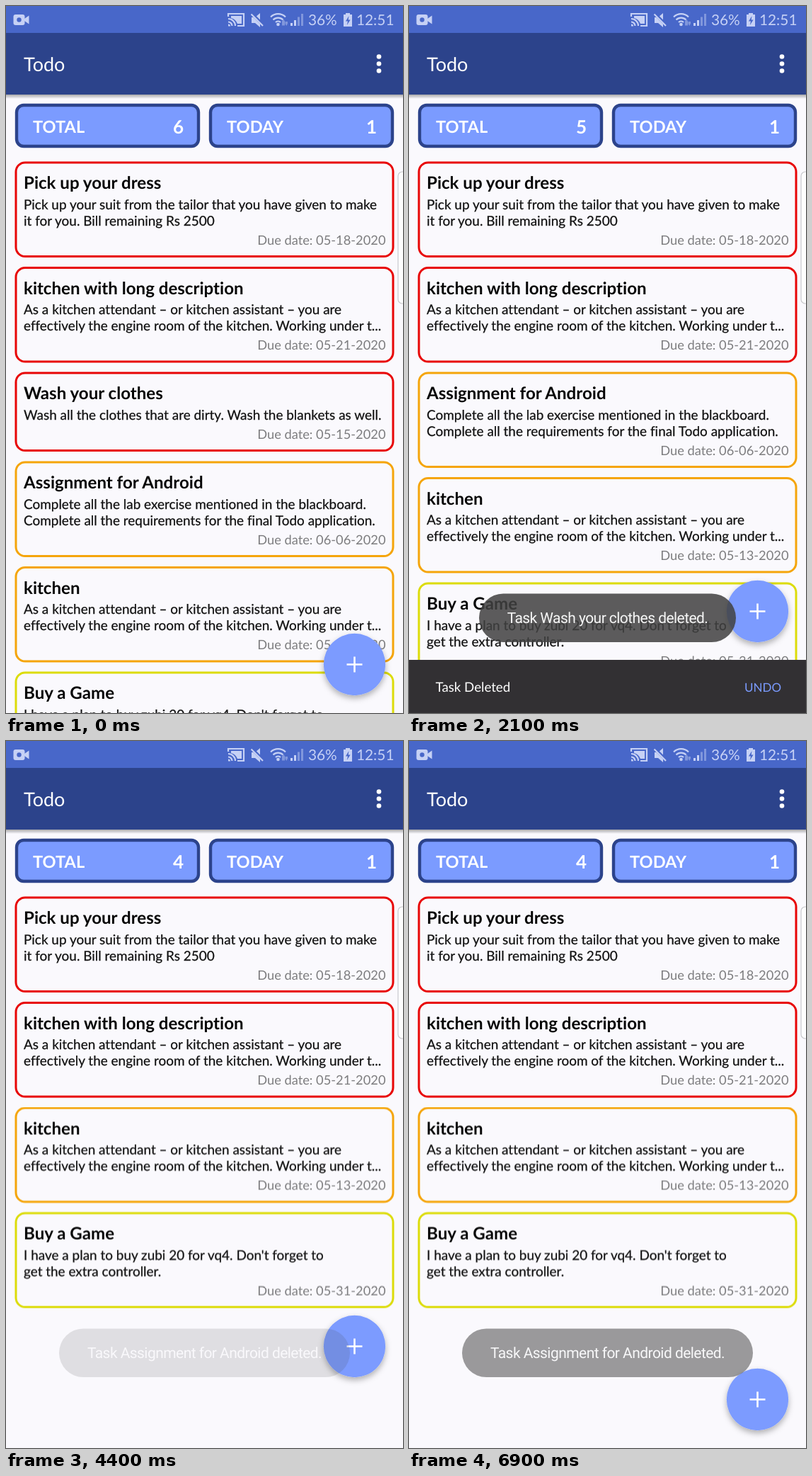
These frames come from a looping animation (561 px wide and 998 px high, 7000 ms). An HTML page:

```html
<!DOCTYPE html>
<html lang="en">
<head>
<meta charset="utf-8">
<title>Todo</title>
<style>
  html, body { margin: 0; width: 100%; height: 100%; overflow: hidden; background: #faf9fd; }
  svg { display: block; width: 100%; height: 100%; }
  text {
    font-family: Lato, "Open Sans", sans-serif;
    font-variant-ligatures: none;
    text-rendering: geometricPrecision;
  }

  .title { font-size: 24.1px; font-weight: 700; fill: #050505; }
  .body { font-size: 18.95px; fill: #111; stroke: #111; stroke-width: .25px; }
  .due { font-size: 18.3px; fill: #7d7d7f; text-anchor: end; }
  .card rect { fill: #faf9fd; stroke-width: 3; }
  .tile rect { fill: #7b9bff; stroke: #2c438b; stroke-width: 4.4; }
  .tile text { font-size: 23.6px; font-weight: 700; fill: #fff; }
  .tile .num { font-size: 26px; text-anchor: end; }
  .status { fill: #c6d1f5; }
  .status text { font-size: 20.8px; }
  .status .line { fill: none; stroke: #c6d1f5; stroke-width: 2.2; }
  .status .dim { fill: #8197dc; }
  .toast rect { fill: #424242; fill-opacity: .86; }
  .toast text { font: 21px Roboto, sans-serif; letter-spacing: -.55px; fill: #f6f6f6; text-anchor: middle; }

  /* Every part shares one 7 s loop: 1% = 70 ms. */
  .anim { animation: 7s linear infinite; }
  #swipe1 { animation-name: swipe1; animation-timing-function: cubic-bezier(.45, 0, .8, .8); }
  #swipe2 { animation-name: swipe2; animation-timing-function: cubic-bezier(.4, 0, .8, .8); }
  #shift1 { animation-name: shift1; }
  #shift2 { animation-name: shift2; }
  #shift1, #shift2 { animation-timing-function: cubic-bezier(.364, 0, .636, 1); }
  #fab { animation-name: fab; }
  #snackbar { animation-name: snackbar; }
  #fab, #snackbar { animation-timing-function: cubic-bezier(.4, 0, .2, 1); }
  #message { animation-name: message; }
  #toast1 { animation-name: toast1; }
  #toast2 { animation-name: toast2; }
  #six { animation-name: six; }
  #five { animation-name: five; }
  #four { animation-name: four; }
  #six, #five, #four { animation-timing-function: step-end; }

  @keyframes swipe1 {
    0%, 13.57% { transform: none; }
    23.43%, 100% { transform: translateX(560px); }
  }
  @keyframes swipe2 {
    0%, 55.72% { transform: none; }
    59%, 100% { transform: translateX(560px); }
  }
  @keyframes shift1 {
    0%, 26% { transform: none; }
    29.57%, 100% { transform: translateY(-126px); }
  }
  @keyframes shift2 {
    0%, 59.29% { transform: none; }
    62.71%, 100% { transform: translateY(-148.5px); }
  }
  /* The button hops up once, then rides on the sliding bar. */
  @keyframes fab {
    0%, 23.71% { transform: none; }
    23.72%, 24.85% { transform: translateY(-75px); }
    24.86% { transform: none; }
    28.43%, 54.96% { transform: translateY(-75px); }
    58.53%, 62.14% { transform: none; }
    62.15%, 62.92% { transform: translateY(-75px); }
    62.93% { transform: none; }
    65.64%, 92.14% { transform: translateY(-75px); }
    95.71%, 100% { transform: none; }
  }
  @keyframes snackbar {
    0%, 24.86% { transform: translateY(75px); }
    28.43%, 54.96% { transform: none; }
    58.53%, 62.93% { transform: translateY(75px); }
    65.64%, 92.14% { transform: none; }
    95.71%, 100% { transform: translateY(75px); }
  }
  @keyframes message {
    0%, 25.86% { opacity: 0; }
    28.43%, 54.96% { opacity: 1; }
    57.53%, 63.5% { opacity: 0; }
    65.64%, 92.14% { opacity: 1; }
    94.71%, 100% { opacity: 0; }
  }
  /* Toasts appear on a decelerating and leave on an accelerating parabola. */
  @keyframes toast1 {
    0%, 24.43% { opacity: 0; animation-timing-function: cubic-bezier(.333, .667, .667, 1); }
    29.86% { opacity: 1; }
    55.72% { opacity: 1; animation-timing-function: cubic-bezier(.333, 0, .667, .333); }
    60.71%, 100% { opacity: 0; }
  }
  @keyframes toast2 {
    0%, 62.36% { opacity: 0; animation-timing-function: cubic-bezier(.333, .667, .667, 1); }
    68.07% { opacity: 1; }
    95% { opacity: 1; animation-timing-function: cubic-bezier(.333, 0, .667, .333); }
    100% { opacity: .234; }
  }
  @keyframes six { 0% { opacity: 1; } 25.14%, 100% { opacity: 0; } }
  @keyframes five { 0% { opacity: 0; } 25.14% { opacity: 1; } 59.29%, 100% { opacity: 0; } }
  @keyframes four { 0% { opacity: 0; } 59.29%, 100% { opacity: 1; } }
</style>
</head>
<body>
<svg viewBox="0 0 561 998" preserveAspectRatio="none">
  <defs>
    <linearGradient id="shade" x2="0" y2="1">
      <stop offset="0" stop-color="#000" stop-opacity=".38"/>
      <stop offset="1" stop-color="#000" stop-opacity="0"/>
    </linearGradient>
    <filter id="drop" x="-30%" y="-30%" width="160%" height="160%">
      <feDropShadow dx="0" dy="4" stdDeviation="4" flood-color="#000" flood-opacity=".3"/>
    </filter>
  </defs>
  <rect width="561" height="998" fill="#faf9fd"/>

  <g id="fixed"></g>
  <g id="swipe1" class="anim"></g>
  <g id="shift1" class="anim">
    <g id="swipe2" class="anim"></g>
    <g id="shift2" class="anim"></g>
  </g>

  <g class="tile">
    <rect x="15" y="140" width="257" height="58" rx="10"/>
    <text x="38" y="179">TOTAL</text>
    <text id="six" class="num anim" x="251" y="179.5">6</text>
    <text id="five" class="num anim" x="251" y="179.5">5</text>
    <text id="four" class="num anim" x="251" y="179.5">4</text>
    <rect x="289" y="140" width="257" height="58" rx="10"/>
    <text x="312" y="179">TODAY</text>
    <text class="num" x="524" y="179.5">1</text>
  </g>

  <rect y="124" width="561" height="7" fill="url(#shade)"/>
  <rect y="37" width="561" height="88" fill="#2c438b"/>
  <rect width="561" height="38" fill="#4867c9"/>
  <text x="25" y="92" font-size="27" fill="#fff">Todo</text>
  <g fill="#fff">
    <circle cx="527" cy="71.5" r="3.3"/>
    <circle cx="527" cy="81.5" r="3.3"/>
    <circle cx="527" cy="91.5" r="3.3"/>
  </g>

  <g class="status">
    <rect x="10.5" y="12" width="16" height="15" rx="3"/>
    <path d="M26 18l6.500-4.500v12L26 21z"/>
    <circle cx="18.5" cy="19.5" r="3.2" fill="#4867c9"/>
    <path class="line" d="M314 15v-4h22v17h-9M314 18a10 10 0 0 1 10 10M314 22.500a5.500 5.500 0 0 1 5.500 5.500"/>
    <path d="M318 14h15v11h-6a13 13 0 0 0-9-8z"/>
    <path d="M314 25.500a3 3 0 0 1 3 3h-3zM347 16h5l7-6v20l-7-6h-5z"/>
    <path d="M347 10.500l17 17" stroke="#4867c9" stroke-width="4.5"/>
    <path class="line" d="M346.500 11.500l16.500 16.500"/>
    <path class="line" d="M374 15.500a15 15 0 0 1 21 0M377.500 19.500a10 10 0 0 1 14 0M381 23a5 5 0 0 1 7 0"/>
    <circle cx="384.5" cy="26" r="2.3"/>
    <path class="dim" d="M390 21.500l2-3 2 3v6h-4zM394.500 22h3.500v3l-1.800 3-1.700-3z"/>
    <rect x="402" y="24" width="3" height="4"/>
    <rect x="407" y="20" width="3" height="8"/>
    <rect class="dim" x="412" y="15.5" width="3" height="12.5"/>
    <rect class="dim" x="417" y="11" width="3" height="17"/>
    <text x="427" y="27">36%</text>
    <path d="M480 12v-2h6v2h3v17h-12V12z"/>
    <path d="M484.500 14l-4.500 7.500h3l-1.200 5.500 4.800-7.500h-3z" fill="#4867c9"/>
    <text x="495" y="27">12:51</text>
  </g>

  <rect x="554" y="234" width="20" height="186" rx="6" fill="#fdfdfe" stroke="#c9c9cd" stroke-width="1.2"/>

  <g id="snackbar" class="anim">
    <rect y="923" width="561" height="75" fill="#323033"/>
    <g id="message" class="anim">
      <text x="37.5" y="968" font-size="18.7" fill="#fff">Task Deleted</text>
      <text x="474" y="968" font-size="17" fill="#7b9bff">UNDO</text>
    </g>
  </g>

  <g id="fab" class="anim">
    <circle cx="492.5" cy="929.5" r="43.7" fill="#7b9bff" filter="url(#drop)"/>
    <path d="M481.500 929.500h22M492.500 918.500v22" stroke="#fff" stroke-width="2.6"/>
  </g>

  <g id="toast1" class="toast anim">
    <rect x="99" y="829.5" width="363" height="68.5" rx="34.25"/>
    <text x="280.5" y="870.5">Task Wash your clothes deleted.</text>
  </g>
  <g id="toast2" class="toast anim">
    <rect x="75" y="829.5" width="411" height="68.5" rx="34.25"/>
    <text x="280.5" y="870.5">Task Assignment for Android deleted.</text>
  </g>
</svg>
<script>
  const RED = '#e80505', ORANGE = '#f5a50a', YELLOW = '#dcdc08';
  const LINE = 23;
  const attendant = [
    'As a kitchen attendant – or kitchen assistant – you are',
    'effectively the engine room of the kitchen. Working under t...'
  ];

  function addCard(parent, top, color, title, lines, due) {
    const extra = (lines.length - 1) * LINE;
    const body = lines.map((line, i) =>
      `<text class="body" x="25" y="${67 + i * LINE}">${line}</text>`).join('');
    document.getElementById(parent).insertAdjacentHTML('beforeend', `
      <g class="card" transform="translate(0 ${top})">
        <rect x="14" y="1.5" width="533" height="${109.5 + extra}" rx="13" stroke="${color}"/>
        <text class="title" x="25" y="38.5">${title}</text>
        ${body}
        <text class="due" x="536.5" y="${94 + extra}">Due date: ${due}</text>
      </g>`);
  }

  addCard('fixed', 219.5, RED, 'Pick up your dress', [
    'Pick up your suit from the tailor that you have given to make',
    'it for you. Bill remaining Rs 2500'
  ], '05-18-2020');
  addCard('fixed', 368, RED, 'kitchen with long description', attendant, '05-21-2020');
  addCard('swipe1', 516.5, RED, 'Wash your clothes', [
    'Wash all the clothes that are dirty. Wash the blankets as well.'
  ], '05-15-2020');
  addCard('swipe2', 642.5, ORANGE, 'Assignment for Android', [
    'Complete all the lab exercise mentioned in the blackboard.',
    'Complete all the requirements for the final Todo application.'
  ], '06-06-2020');
  addCard('shift2', 791, ORANGE, 'kitchen', attendant, '05-13-2020');
  addCard('shift2', 939.5, YELLOW, 'Buy a Game', [
    "I have a plan to buy zubi 20 for vq4. Don't forget to",
    'get the extra controller.'
  ], '05-31-2020');
</script>
</body>
</html>
```
